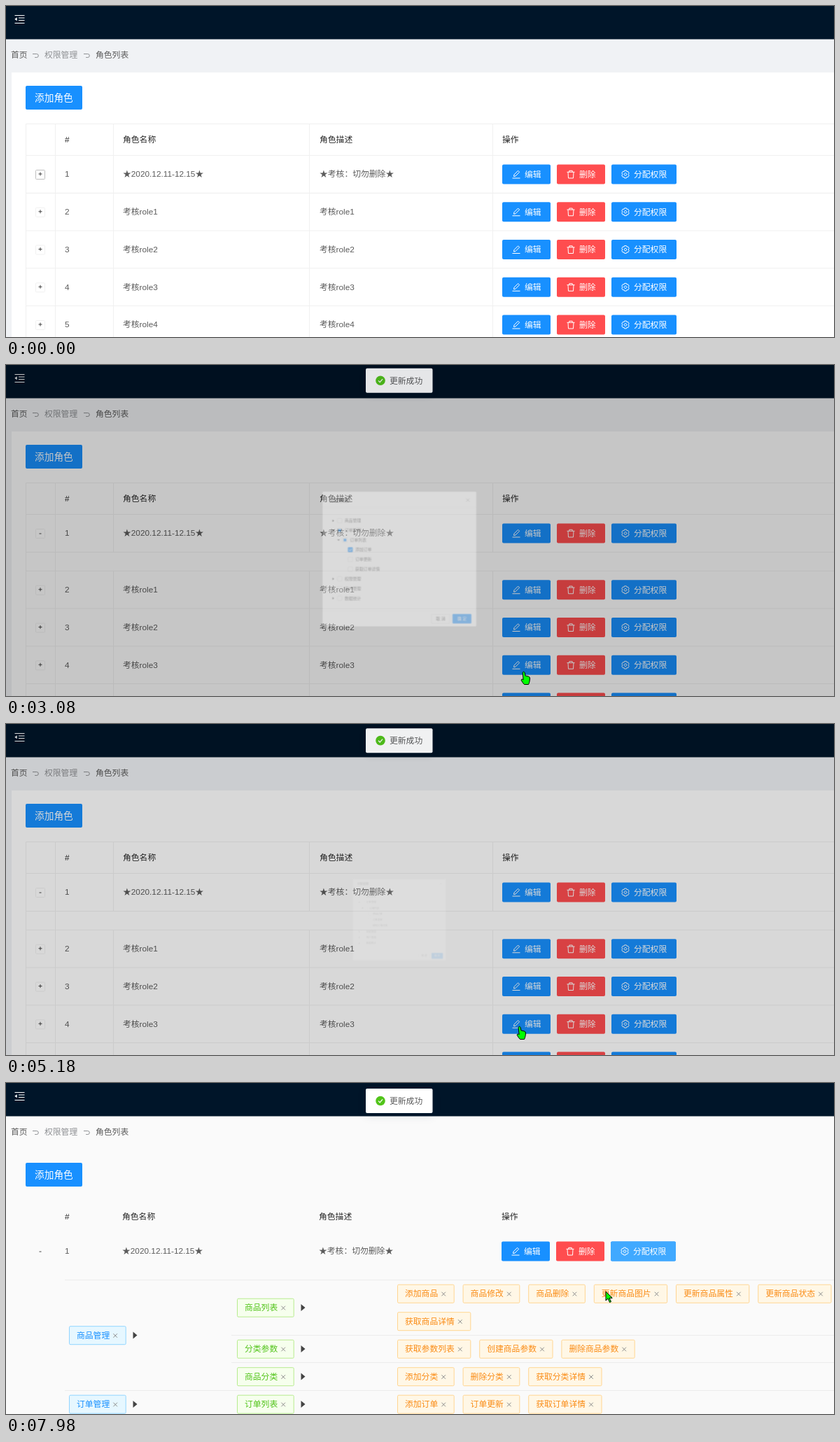
Animation, 1183 px wide and 473 px high, one loop 8 s. Source, as an HTML page:

```html
<!DOCTYPE html>
<html lang="zh">
<head>
<meta charset="utf-8">
<title>角色列表</title>
<style>
html, body { margin: 0; width: 100%; height: 100%; overflow: hidden; background: #f0f2f5; }
svg { display: block; width: 1183px; height: 473px; }
text { font: 300 11.8px "Liberation Sans", "DejaVu Sans", "Noto Sans CJK SC", "Noto Sans CJK", sans-serif; }
.big { font-size: 13.7px; }
.mid { text-anchor: middle; }
.line { stroke: #f0f0f0; fill: none; }
.icon { fill: none; stroke: #fff; stroke-linejoin: round; }
.modal { transform-origin: 562px 283px; }
.toast rect { filter: drop-shadow(0 4px 6px rgba(0, 30, 60, .12)); }
.pointer path { fill: #0f0; stroke: #000; stroke-linejoin: round; }
</style>
</head>
<body>
<script>
const LOOP = 8000;
const BLUE = '#1890ff', RED = '#ff4d4f', GREEN = '#52c41a';
const DARK = '#262626', TEXT = '#5c5c5c', FAINT = '#8f9194';
const OUT = 'cubic-bezier(.08,.82,.17,1)';
const INOUT = 'cubic-bezier(.78,.14,.15,.86)';
const IN = 'cubic-bezier(.6,.04,.98,.34)';

// ---- timeline: every stop is [ms, css, easing to the next stop]
let css = '';
function track(name, stops, ease = 'linear') {
  const body = stops.map(([ms, rule, fn]) =>
    `${ms / LOOP * 100}%{${rule}${fn ? `;animation-timing-function:${fn}` : ''}}`).join('');
  css += `@keyframes ${name}{${body}}.${name}{animation:${name} ${LOOP}ms ${ease} infinite}`;
}
// visible during each [from, to] span
function show(name, ...spans) {
  const stops = [[0, 'opacity:0']];
  for (const [from, to] of spans) stops.push([from, 'opacity:1'], [to, 'opacity:0']);
  track(name, stops, 'step-end');
}

const OPEN = [1110, 3764, 5660], CLOSE = [2980, 5048, 7640];
const modal = [], mask = [], toast = [];
const small = 'opacity:0;transform:scale(.2)', full = 'opacity:1;transform:scale(1)';
const above = 'opacity:0;transform:translateY(-32px)', rest = 'opacity:1;transform:none';
modal.push([0, small]); mask.push([0, 'opacity:0']); toast.push([0, above]);
OPEN.forEach((open, i) => {
  const close = CLOSE[i];
  modal.push([open, small, OUT], [open + 300, full], [close, full, INOUT], [close + 200, small]);
  mask.push([open, 'opacity:0'], [open + 200, 'opacity:1'], [close, 'opacity:1'], [close + 200, 'opacity:0']);
  toast.push([close, above, OUT], [close + 300, rest]);
  if (i < 2) toast.push([close + 1510, rest, IN], [close + 1760, above]);
});
modal.push([LOOP, small]); mask.push([LOOP, 'opacity:0']); toast.push([LOOP, rest]);
track('modal', modal);
track('mask', mask);
track('toast', toast);

const down = y => `transform:translateY(${y}px)`;
track('rows', [[0, down(0)], [240, down(27)], [3090, down(67)], [5160, down(27)], [7800, down(300)], [LOOP, down(300)]], 'step-end');
track('nudge', [[0, 'transform:none'], [7840, 'transform:translateX(-1px)'], [LOOP, 'transform:translateX(-1px)']], 'step-end');

show('focus', [0, 40]);
show('closed', [0, 240]);
show('opened', [240, LOOP]);
show('grid', [0, 7840]);
show('pale', [7840, LOOP]);
show('oneTag', [3090, 5160]);
show('allTags', [7800, LOOP]);
show('lit', [900, 1130], [3560, 3790], [5500, 5690], [7860, LOOP]);
show('goods', [6320, LOOP]);
show('half', [2160, 4400]);
show('leaf', [2160, 4400], [6960, LOOP]);
show('orders', [6960, LOOP]);
show('near', [1800, 2260], [4260, 4500]);

const hands = [[240, 420], [860, 1200], [1760, 2320], [2860, 3200], [3520, 3840],
  [4240, 4540], [4900, 5260], [5460, 5710], [6180, 7160], [7480, 7690]];
show('hand', ...hands);
show('arrow', ...hands.map(([, end], i) => [end, i + 1 < hands.length ? hands[i + 1][0] : LOOP]));

const path = [
  [0, 49, 240], [400, 51, 241], [960, 905, 243], [1180, 903, 243], [1800, 422, 244], [2260, 422, 244],
  [2680, 492, 304], [2900, 740, 438], [3120, 740, 438], [3600, 902, 240], [3800, 898, 240],
  [3980, 788, 240], [4300, 422, 245], [4480, 423, 246], [4960, 736, 434], [5180, 734, 432],
  [5540, 905, 241], [5690, 900, 241], [5940, 660, 246], [6240, 391, 160], [6440, 391, 161],
  [6800, 391, 188], [7100, 392, 189], [7540, 741, 443], [7650, 741, 443], [7980, 857, 298], [LOOP, 857, 298]];
track('pointer', path.map(([ms, x, y]) => [ms, `transform:translate(${x}px,${y}px)`, 'ease-in-out']));

// ---- drawing helpers
const g = (name, ...parts) => `<g class="${name}">${parts.join('')}</g>`;
const at = (x, y, body) => `<g transform="translate(${x} ${y})">${body}</g>`;
const text = (x, cy, s, fill = TEXT, cls = '') =>
  `<text x="${x}" y="${cy + (cls.includes('big') ? 5.1 : 4.3)}" fill="${fill}" class="${cls}">${s}</text>`;
const rect = (x, y, w, h, fill, extra = '') =>
  `<rect x="${x}" y="${y}" width="${w}" height="${h}" fill="${fill}" ${extra}/>`;
const line = d => `<path class="line" d="${d}"/>`;
const cross = (x, y, r, color) =>
  `<path d="M${x - r} ${y - r}l${2 * r} ${2 * r}m0 ${-2 * r}l${-2 * r} ${2 * r}" stroke="${color}" fill="none"/>`;

const ICONS = {
  edit: 'M.5 11.5h11M2.5 9l.5-2.6L8.6.8l2 2L5 8.5z',
  trash: 'M.5 2.8h11M3.8 2.8V.8h4.4v2M2 2.8l.5 8.7h7l.5-8.7',
  gear: 'M4.6.6h2.8l.6 1.6 1.7-.3 1.5 2.5L10.1 6l1.1 1.6-1.5 2.5-1.7-.3-.6 1.6H4.6L4 9.8l-1.7.3L.8 7.6 1.9 6 .8 4.4l1.5-2.5L4 2.2zM6 4.2a1.8 1.8 0 1 0 .01 0z',
};
const button = (x, cy, w, fill, icon, label) =>
  rect(x, cy - 13.5, w, 28, fill, 'rx="2"') +
  at(x + 14, cy - 5.5, `<path class="icon" d="${ICONS[icon]}"/>`) +
  text(x + 32, cy + .5, label, '#fff');
const assign = (cy, fill) => button(865, cy, 93, fill, 'gear', '分配权限');

const box = (cy, color) => rect(42.5, cy - 5.5, 13, 13, '#fff', `stroke="${color}" rx="1"`);
const sign = (cy, d) => `<path d="M${d === '+' ? `46.5 ${cy}h5M49 ${cy - 2.5}v5` : `47.5 ${cy + 1}h3`}" stroke="#444"/>`;

const COLS = [153.5, 433.5, 695.5], PITCH = 53.75;
const cells = (cy, name, note) => g('nudge',
  text(167, cy, name), text(448, cy, note),
  button(709, cy, 69, BLUE, 'edit', '编辑'), button(787, cy, 69, RED, 'trash', '删除'), assign(cy, BLUE));

function laterRow(i) {
  const cy = 240 + i * PITCH, top = 213.5 + i * PITCH;
  return g('grid', box(cy, '#f0f0f0'), line(`M28 ${top}H1183` + COLS.map(x => `M${x} ${top}v${PITCH}`).join(''))) +
    sign(cy, '+') + text(84, cy, i + 1) + cells(cy, '考核role' + i, '考核role' + i);
}

// ---- permission tags
const SKIN = {
  blue: ['#e6f7ff', '#91d5ff', BLUE],
  green: ['#f6ffed', '#b7eb8f', GREEN],
  orange: ['#fff7e6', '#ffd591', '#fa8c16'],
};
const tagWidth = s => 23.5 + 11 + s.length * 11.8;
function tag(x, cy, s, skin) {
  const [fill, edge, ink] = SKIN[skin], w = tagWidth(s);
  return rect(x + .5, cy - 12.8, w - 1, 26, fill, `stroke="${edge}" rx="1.5"`) +
    text(x + 11, cy, s, ink) + cross(x + w - 15.5, cy + .5, 2.8, '#8c8c8c');
}
const next = (x, cy) => `<path d="M${x} ${cy - 5}l6 5-6 5z" fill="#444"/>`;
const lead = (cy, s) => tag(90, cy, s, 'blue') + next(181.5, cy);
const branch = (cy, s) => tag(330, cy, s, 'green') + next(421.5, cy);
function leaves(cy, list) {
  let x = 559;
  return list.split(' ').map(s => {
    const out = tag(x, cy, s, 'orange');
    x += tagWidth(s) + 11.9;
    return out;
  }).join('');
}

// ---- permission tree
const TREE = [
  [0, '商品管理', 'goods'], [0, '订单管理', 'orders', 'half'], [1, '订单列表', 'orders', 'half'],
  [2, '添加订单', 'leaf'], [2, '订单更新', 'orders'], [2, '获取订单详情', 'orders'],
  [0, '权限管理'], [0, '用户管理'], [0, '数据统计']];
function node([depth, label, full, half], i) {
  const cy = 161 + i * 27.75, x = 384 + depth * 15.2;
  const square = (fill, edge) => rect(x + .5, cy - 6, 13, 13, fill, `stroke="${edge}" rx="1.5"`);
  const open = i === 1 || i === 2;
  const caret = depth === 2 ? '' : open
    ? `<path d="M${x - 15} ${cy - 1.5}h7l-3.5 4.2z" fill="#444"/>`
    : `<path d="M${x - 13.5} ${cy - 3}l4.2 3.5-4.2 3.5z" fill="#444"/>`;
  return caret + square('#fff', '#d9d9d9') +
    (i === 3 ? g('near', square('#fff', BLUE)) : '') +
    (half ? g(half, rect(x + 3.2, cy - 3.3, 7.6, 7.6, BLUE)) : '') +
    (full ? g(full, square(BLUE, BLUE), `<path d="M${x + 3.5} ${cy + .5}l2.7 2.8 4.6-5.2" stroke="#fff" stroke-width="1.6" fill="none"/>`) : '') +
    text(x + 21, cy, label);
}

const crumb = x => `<path d="M${x} 68.5h5.8a2.5 2.5 0 0 1 0 5h-2.6" stroke="${FAINT}" fill="none"/>`;

const scene = [
  rect(0, 0, 1183, 473, '#f0f2f5'),
  rect(8, 95, 1175, 378, '#fff'),
  g('pale', rect(0, 47, 1183, 426, '#fafafa')),
  rect(0, 0, 1183, 47.5, '#001529'),
  '<path d="M12.5 13.5h14M18 17h8.5M18 20.5h8.5M12.5 24.5h14" stroke="#fff" stroke-width="1.2"/><path d="M12.3 18.8l3.4-2.5v5z" fill="#fff"/>',
  text(7, 70, '首页'), crumb(38), text(55, 70, '权限管理', FAINT), crumb(111), text(128, 70, '角色列表'),
  rect(28, 114, 81, 34, BLUE, 'rx="2"'), text(41, 131, '添加角色', '#fff', 'big'),

  g('grid', line('M28.5 473V168.5H1183M28 213.5H1183M28 267.5H1183M70.5 168V473' + COLS.map(x => `M${x} 168v99`).join('')),
    box(240, '#f0f0f0')),
  text(84, 191, '#', DARK),
  g('nudge', text(167, 191, '角色名称', DARK), text(448, 191, '角色描述', DARK), text(709, 191, '操作', DARK)),
  g('focus', box(240, '#bfbfbf')), g('closed', sign(240, '+')), g('opened', sign(240, '-')),
  text(84, 240, 1), cells(240, '★2020.12.11-12.15★', '★考核：切勿删除★'),
  g('nudge', g('lit', assign(240, '#40a9ff'))),

  g('oneTag', line('M84 281.5H1183M84 321.5H1183'),
    lead(301, '订单管理'), branch(301, '订单列表'), leaves(301, '添加订单')),
  g('allTags',
    '<path d="M84 281.5H1183M322 360.5H1183M322 399.5H1183M84 439.5H1183" stroke="#ececec"/>',
    lead(360.5, '商品管理'), branch(321, '商品列表'),
    leaves(301, '添加商品 商品修改 商品删除 更新商品图片 更新商品属性 更新商品状态'), leaves(340.5, '获取商品详情'),
    branch(380, '分类参数'), leaves(380, '获取参数列表 创建商品参数 删除商品参数'),
    branch(419.5, '商品分类'), leaves(419.5, '添加分类 删除分类 获取分类详情'),
    lead(459, '订单管理'), branch(459, '订单列表'), leaves(459, '添加订单 订单更新 获取订单详情')),
  g('rows', [1, 2, 3, 4].map(laterRow).join('')),

  g('mask', rect(0, 0, 1183, 473, 'rgba(0,0,0,.45)')),
  g('modal', rect(342, 78.5, 440, 386, '#fff', 'rx="2"'),
    text(362, 102, '分配权限', DARK, 'big'), cross(758, 102.5, 4.6, '#8c8c8c'),
    line('M342 124.5h440M342 420.5h440'), TREE.map(node).join(''),
    rect(653.5, 429.5, 53, 26, '#fff', 'stroke="#d9d9d9" rx="2"'), text(680, 443, '取 消', TEXT, 'mid'),
    rect(714, 429, 54, 27, BLUE, 'rx="2"'), text(741, 443, '确 定', '#fff', 'mid')),
  g('toast', rect(514, 8, 95.5, 35, '#fff', 'rx="2"'),
    `<circle cx="535" cy="25.5" r="6.8" fill="${GREEN}"/><path d="M532 25.6l2.2 2.3 3.8-4.5" stroke="#fff" stroke-width="1.3" fill="none"/>`,
    text(548, 25.5, '更新成功')),
  g('pointer',
    g('arrow', '<path d="M0 0v13l3-3 2.5 5.5 2-1L5 9.300h4.200z"/>'),
    g('hand', '<path d="M-2 1.500Q-.500-1 1.200 1.500L2 6l4.500 1q2 .500 2 3l-.500 4q-.500 3-1.500 4.500H.500Q-2 16-3.800 12.500q0-2 2-1.500l1 .800z"/>')),
];

const style = document.createElement('style');
style.textContent = css;
document.head.append(style);
document.body.insertAdjacentHTML('beforeend', `<svg viewBox="0 0 1183 473">${scene.join('')}</svg>`);
</script>
</body>
</html>
```
